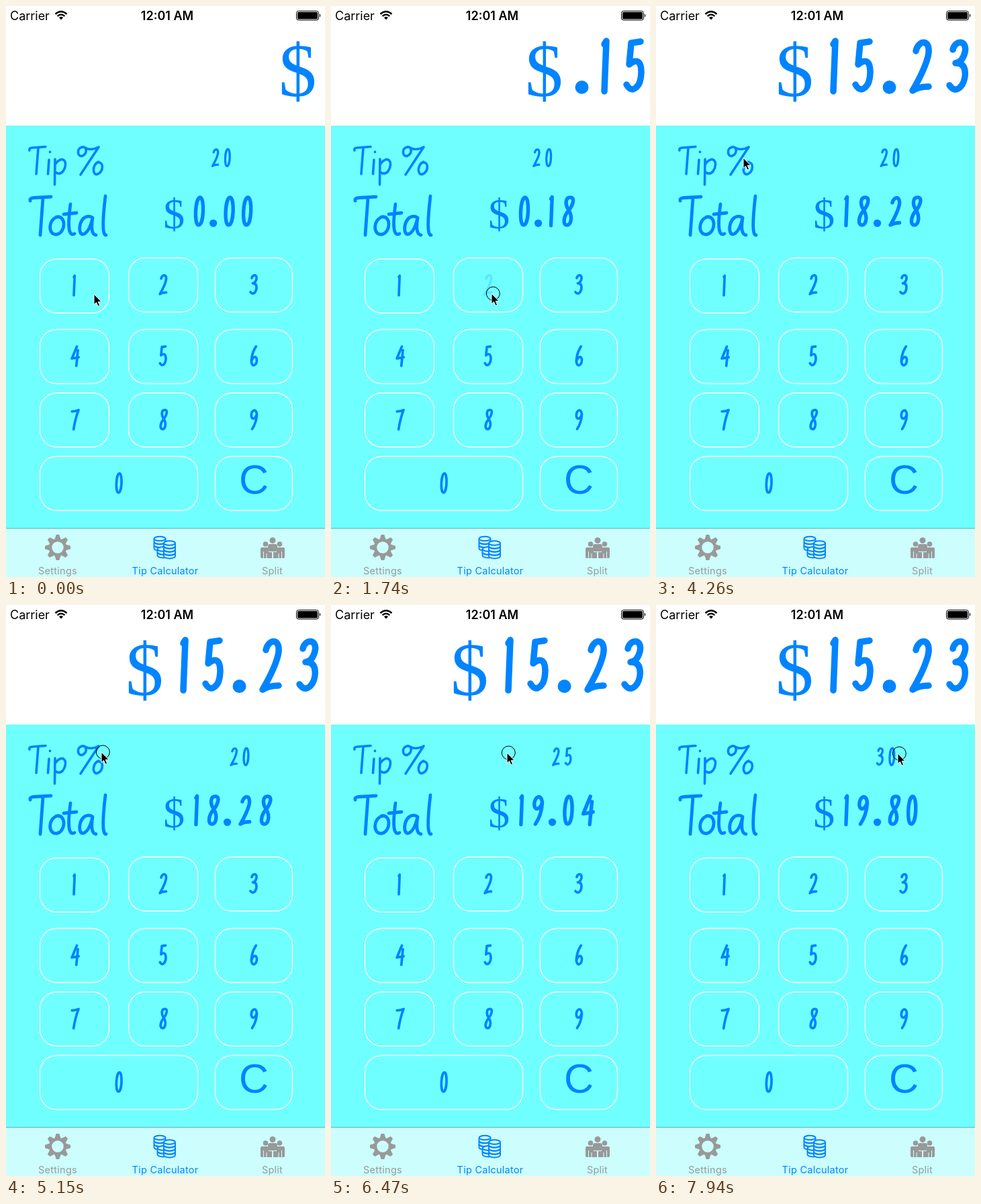
An HTML page for the animation above (8 s loop, 475 by 850 pixels).

```html
<!DOCTYPE html>
<html lang="en">
<head>
<meta charset="utf-8">
<title>Tip Calculator</title>
<style>
  html, body { margin: 0; width: 100%; height: 100%; overflow: hidden; background: #70ffff; }
  svg { display: block; width: 475px; height: 850px; }
  text { font-family: Inter, "Open Sans", sans-serif; }
  .pen { fill: none; stroke: #0084ff; stroke-linecap: round; stroke-linejoin: round; }
  .dollar { font-family: "Liberation Serif", "Noto Serif", serif; font-size: 113px; fill: #0084ff; }
  .clear { font: 61px "Liberation Sans", sans-serif; fill: #0084ff; text-anchor: middle; }
  .tab { font-size: 14.5px; letter-spacing: .25px; text-anchor: middle; }
</style>
</head>
<body>
<svg viewBox="0 0 475 850">
  <rect width="475" height="850" fill="#70ffff"/>
  <rect width="475" height="178" fill="#fff"/>

  <!-- status bar -->
  <text x="6" y="21" font-size="18">Carrier</text>
  <text x="240" y="21" font-size="18" font-weight="600" text-anchor="middle">12:01 AM</text>
  <path d="M73.5 12Q82 4.5 90.5 12M76.6 15.2Q82 10.4 87.4 15.2" fill="none" stroke="#000" stroke-width="2.4"/>
  <path d="M79 17.2Q82 14.8 85 17.2L82 20.5Z"/>
  <rect x="432.5" y="7.5" width="33" height="13.5" rx="3" fill="none" stroke="#000"/>
  <rect x="434" y="9" width="30" height="10.5" rx="1.5"/>
  <path d="M467 11.5q2.5 2.7 0 5.4z"/>

  <!-- handwritten labels -->
  <g class="pen" stroke-width="3.6" role="img" aria-label="Tip %">
    <path d="M35 215Q34 211 39 211L59 209.5M48 211L45 250M64 229L62.5 250M65.5 217v.5"/>
    <path d="M73 228L72.5 266M73 236C84 220 94 232 85 246Q80 252 73 247"/>
    <path d="M115 210C104 210 106 226 114 223C122 219 120 208 113 210M118 211Q126 216 138 210L111 251"/>
    <path d="M138 232C128 235 128 254 137 250C145 246 146 232 137 233"/>
  </g>
  <g class="pen" stroke-width="4.8" role="img" aria-label="Total">
    <path d="M36 290Q35 286 41 285.500L67 284M55 286L51 341M77 314C62 317 62 342 76 340C90 336 89 311 75 314"/>
    <path d="M96 295Q89 346 102 339M86 310L105 308M127 314C110 308 105 338 114 340Q124 338 129 315Q125 340 134 341M148 283Q141 342 149 341"/>
  </g>

  <g id="keys"></g>
  <text class="clear" x="369" y="726">C</text>

  <!-- tab bar -->
  <rect y="777" width="475" height="73" fill="#ccfefe"/>
  <rect y="777" width="475" height="1" fill="#62b2b2"/>
  <g id="gear" fill="#999" transform="translate(77 806)">
    <circle r="11" fill="none" stroke="#999" stroke-width="4.5"/>
  </g>
  <g id="coins" fill="#ccfefe" stroke="#0084ff" stroke-width="1.9"></g>
  <g fill="#999">
    <circle cx="397" cy="795.5" r="4.5"/>
    <circle cx="386.5" cy="801" r="3.8"/>
    <circle cx="407.5" cy="801" r="3.8"/>
    <rect x="390" y="801" width="14" height="11" rx="3"/>
    <rect x="379" y="806" width="12" height="16" rx="2"/>
    <rect x="403" y="806" width="12" height="16" rx="2"/>
    <rect x="389" y="813" width="7" height="9"/>
    <rect x="398" y="813" width="7" height="9"/>
    <path d="M383.500 812V822M410.500 812V822M388 815V822M406 815V822" stroke="#ccfefe"/>
  </g>
  <text class="tab" x="77" y="846" fill="#999">Settings</text>
  <text class="tab" x="237" y="846" fill="#0084ff">Tip Calculator</text>
  <text class="tab" x="396.5" y="846" fill="#999">Split</text>

  <g id="values"></g>
  <g id="cursor">
    <circle id="touch" cx="2.3" r="10" fill="none" stroke="#000"/>
    <path d="M0 0V15.5L3.5 12.3L6 18L8.6 16.9L6.2 11.3H11Z" stroke="#fff"/>
  </g>
</svg>

<script>
const $ = id => document.getElementById(id);

// Pen strokes on an 85-unit-high body: [advance, path]
const GLYPHS = {
  0: [47, 'M19 6C31 6 29 79 15 79C2 79 6 6 19 6Z'],
  1: [35, 'M8 10L11 5L8 80'],
  2: [57, 'M14 20C18 2 38 2 32 28Q27 48 9 79Q18 73 33 73'],
  3: [54, 'M12 18C16 2 34 4 30 22Q26 37 16 38C34 36 32 60 26 70Q16 84 7 71'],
  4: [52, 'M28 6L9 52L35 47M32 20L26 80'],
  5: [50, 'M27 6L13 8L10 40C32 22 30 60 24 70Q14 84 6 70'],
  6: [47, 'M25 6Q9 30 7 60C8 88 28 80 28 56C26 40 12 44 7 64'],
  7: [47, 'M7 12Q20 11 32 6Q19 40 13 80'],
  8: [49, 'M20 40C30 28 38 6 24 6C10 6 10 26 20 40C32 60 24 80 15 79C3 78 6 56 20 40Z'],
  '.': [32, 'M6.5 74h.01'],
  $: [75]
};
GLYPHS[9] = [49, GLYPHS[6][1], 'rotate(180 18 42.5)'];
const SPACING = 18;
const advance = s => [...s].reduce((sum, c) => sum + GLYPHS[c][0], 0);

function write(s, x, y, scale) {
  let pen = 0, out = '';
  for (const c of s) {
    const [adv, d, turn = ''] = GLYPHS[c];
    out += c === '$'
      ? `<text class="dollar" x="${pen - 3}" y="87">$</text>`
      : `<path class="pen" stroke-width="${c === '.' ? 20 : 9.5}" transform="translate(${pen}) ${turn}" d="${d}"/>`;
    pen += adv;
  }
  return `<g transform="translate(${x} ${y}) scale(${scale})">${out}</g>`;
}

// Keypad grid
const COLS = [[50, 104], [182, 104], [311, 116]], ROWS = [375, 481.5, 576, 670.5];
function key(label, x, y, w) {
  const digit = label && write(label, x + w / 2 - (advance(label) - SPACING + 4) * .195, y + 23, .39);
  $('keys').innerHTML +=
    `<rect x="${x + .5}" y="${y}" width="${w - 1}" height="80.5" rx="25" fill="none" stroke="#fff" stroke-width="1.3"/>` +
    `<g id="key${label}">${digit}</g>`;
}
for (let i = 0; i < 9; i++) {
  const [x, w] = COLS[i % 3];
  key(String(i + 1), x, ROWS[Math.floor(i / 3)] + (i ? 0 : 1.5), w);
}
key('0', 50, ROWS[3], 236);
key('', 311, ROWS[3], 116);

for (let a = 0; a < 360; a += 45)
  $('gear').innerHTML += `<path transform="rotate(${a})" d="M-4.5 -12L-2.3 -19H2.3L4.5 -12Z"/>`;

function stack(x, y, count) {
  for (let top = y + (count - 1) * 5; top >= y; top -= 5)
    $('coins').innerHTML +=
      `<path d="M${x - 8.5} ${top}v4.5a8.5 3.5 0 0 0 17 0v-4.5"/><ellipse cx="${x}" cy="${top}" rx="8.5" ry="3.2"/>`;
}
stack(229, 793, 3);
stack(234, 808.5, 2);
stack(243.5, 799.5, 4);

// Pointer stops: [arrive, leave, x, y], in ticks
const STOPS = [
  [0, 3, 131, 429], [4, 6, 205, 497], [7, 8, 232, 500], [11, 11, 239, 428],
  [14, 19, 337, 428], [23, 25, 179, 269], [28, 28, 130, 226], [30, 30, 108, 220],
  [34, 34, 142, 219], [38, 38, 183, 219], [43, 43, 262, 220], [49, 51, 413, 221],
  [53, 54, 360, 221]
];
function pointer(tick) {
  const i = STOPS.findIndex(s => tick <= s[1]);
  const [arrive, , x, y] = STOPS[i];
  if (tick >= arrive) return [x, y];
  const [, leave, x0, y0] = STOPS[i - 1];
  const k = (tick - leave) / (arrive - leave);
  return [x0 + (x - x0) * k, y0 + (y - y0) * k];
}

const LOOP = 8000, DRAG = 34;
const DIGITS = '1523', TYPED = [4, 8, 12, 19];
const TAPS = { 7: '5', 11: '2', 19: 'none' };
let shown = -1;

function draw(tick) {
  const [x, y] = pointer(tick);
  const count = TYPED.filter(t => t <= tick).length;
  const amount = DIGITS.slice(0, count) / 100;
  const tip = tick < DRAG ? 20 : Math.round(22 + (x - 190) / 22);
  const bill = '$' + (count ? amount.toFixed(2).replace(/^0/, '') : '');
  const total = '$' + (amount * (1 + tip / 100)).toFixed(2);
  const rate = String(tip);
  const rateX = 179 + advance(total) * .565 - (advance(rate) - SPACING) * .1725;

  $('values').innerHTML =
    write(bill, 466 - advance(bill) + SPACING, 47, 1) +
    write(total, 236, 281.5, .565) +
    write(rate, rateX, 211, .345);
  for (const d of DIGITS) $('key' + d).style.opacity = TAPS[tick] === d ? .2 : 1;
  $('cursor').setAttribute('transform', `translate(${x} ${y})`);
  $('touch').style.display = tick in TAPS || tick >= DRAG ? '' : 'none';
}

function frame() {
  const t = performance.now() % LOOP;
  // The screen refreshes in even ticks after the first pause.
  const tick = t < 750 ? 0 : Math.floor((t - 105) / 147.6);
  if (tick !== shown) draw(shown = tick);
  requestAnimationFrame(frame);
}
frame();
</script>
</body>
</html>
```
